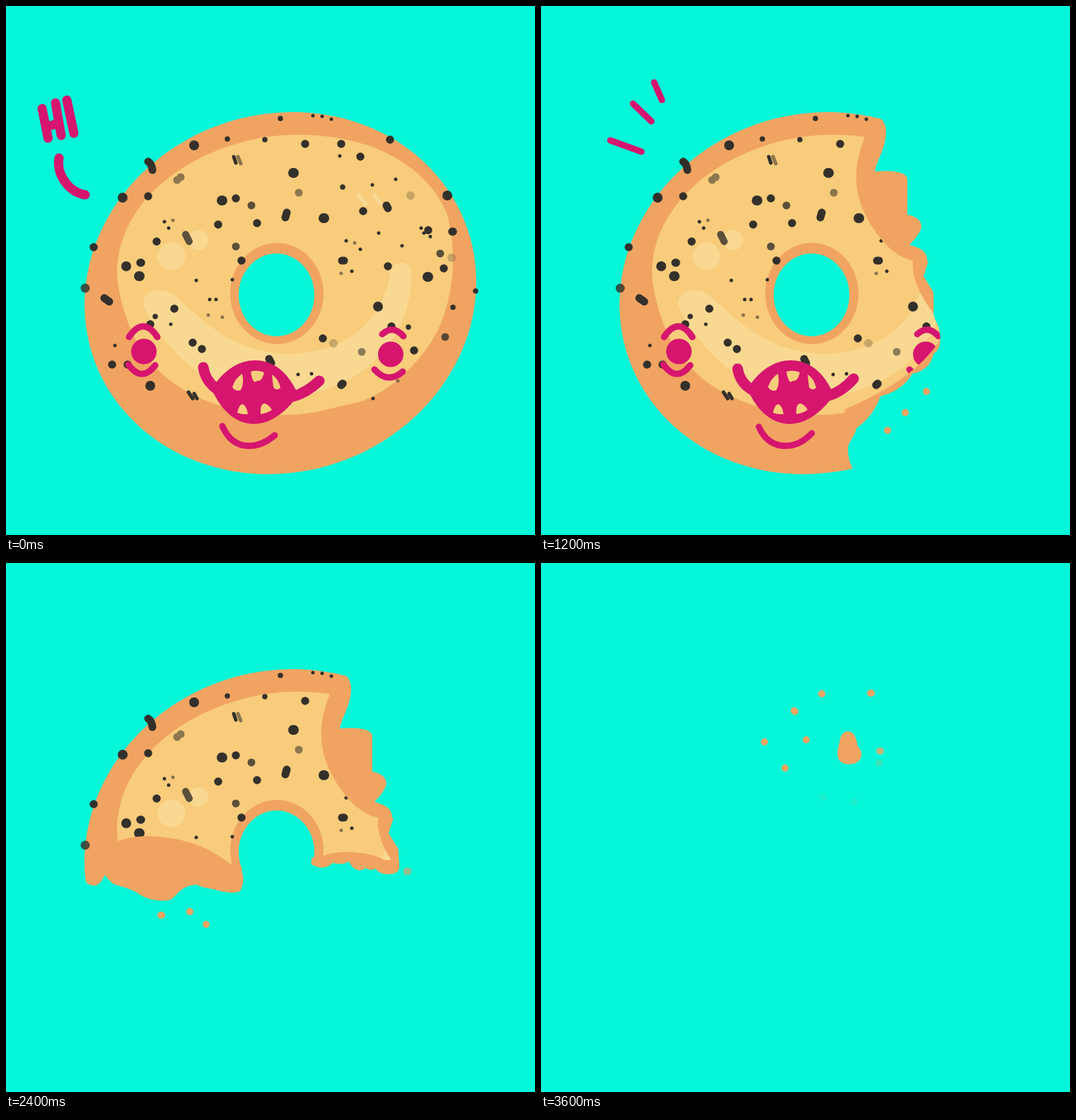
These frames come from a looping animation (748 by 748 pixels, 4 s). An HTML page without scripts:

```html
<!DOCTYPE html>
<html lang="en">
<head>
<meta charset="utf-8">
<title>Bitten bagel</title>
<style>
:root { --sky: #05f6d8; --crust: #f1a462; --cream: #f8cc7b; --shine: #f9d992; --pink: #d6156f; --seed: #33302b; }
html, body { margin: 0; width: 100%; height: 100%; overflow: hidden; background: var(--sky); }
svg { display: block; width: 100vw; height: 100vh; }

.sky { fill: var(--sky); }
.crust { fill: var(--crust); clip-path: url(#edge); }
.crumb { fill: none; stroke: var(--crust); stroke-width: 10; stroke-linecap: round; }
.seeds { fill: none; stroke: var(--seed); stroke-linecap: round; }
.pink { fill: var(--pink); }
.line { fill: none; stroke: var(--pink); stroke-width: 9; stroke-linecap: round; stroke-linejoin: round; }

/* a 4 s loop of ten 0.4 s poses; --k is the pose an item starts on */
.one, .two { visibility: hidden; animation: one 4s calc(var(--k) * .4s) step-end infinite; }
.two { animation-name: two; }
@keyframes one { 0% { visibility: visible } 10%, 100% { visibility: hidden } }
@keyframes two { 0% { visibility: visible } 20%, 100% { visibility: hidden } }

/* bites stay from their pose to the end of the loop */
.bite { animation: 4s step-end infinite; }
.b1 { animation-name: b1 } .b2 { animation-name: b2 } .b3 { animation-name: b3 } .b4 { animation-name: b4 }
.b5 { animation-name: b5 } .b6 { animation-name: b6 } .b7 { animation-name: b7 } .b8 { animation-name: b8 }
.b9 { animation-name: b9 }
@keyframes b1 { 0% { visibility: hidden } 10% { visibility: visible } }
@keyframes b2 { 0% { visibility: hidden } 20% { visibility: visible } }
@keyframes b3 { 0% { visibility: hidden } 30% { visibility: visible } }
@keyframes b4 { 0% { visibility: hidden } 40% { visibility: visible } }
@keyframes b5 { 0% { visibility: hidden } 50% { visibility: visible } }
@keyframes b6 { 0% { visibility: hidden } 60% { visibility: visible } }
@keyframes b7 { 0% { visibility: hidden } 70% { visibility: visible } }
@keyframes b8 { 0% { visibility: hidden } 80% { visibility: visible } }
@keyframes b9 { 0% { visibility: hidden } 90% { visibility: visible } }
</style>
</head>
<body>
<svg viewBox="0 0 748 748" xmlns="http://www.w3.org/2000/svg">
<defs>
  <clipPath id="edge"><ellipse cx="388" cy="406" rx="279.7" ry="253" transform="rotate(-19.1 388 406)"/></clipPath>
  <g id="jaw">
    <path class="pink" d="M291 542C320 490 385 482 413 550C375 605 320 607 291 542Z"/>
    <path fill="var(--cream)" d="M320 539Q324 526 334 520Q337 534 332 543Q325 546 320 539ZM346 517Q355 514 365 518Q362 532 355 530Q349 536 346 517ZM376 521Q386 528 388 540Q382 545 378 539ZM327 575Q330 562 335 563Q340 565 342 577Q334 578 327 575ZM360 577Q359 562 366 562Q372 564 376 571Q369 576 360 577Z"/>
  </g>
</defs>

<!-- bagel -->
<ellipse cx="388" cy="406" rx="279.7" ry="253" transform="rotate(-19.1 388 406)" fill="var(--crust)"/>
<path fill="var(--cream)" d="M415 182C530 183 600 235 624 295C643 370 625 440 600 477C575 515 530 555 490 562C450 571 430 578 395 578C270 577 195 520 170 440C160 410 157 390 157 375C160 255 300 180 415 182Z"/>
<g fill="var(--shine)">
  <path d="M194 424C192 402 220 396 236 408C275 440 315 490 400 492C480 490 530 450 543 380C546 356 573 358 573 380C573 440 545 490 495 522C440 556 370 562 320 546C260 520 215 470 194 424Z"/>
  <circle cx="234" cy="354" r="19.5"/>
  <circle cx="272" cy="331" r="14"/>
  <path d="M496 265L510 282M519 266L531 281" stroke="var(--shine)" stroke-width="6"/>
</g>
<ellipse cx="383" cy="406.500" rx="66" ry="71.500" fill="var(--crust)"/>
<ellipse class="sky" cx="382.500" cy="408.500" rx="53.500" ry="58.500"/>

<g class="seeds">
  <path stroke-width="14" d="M266 197h0M165 271h0M305 275h1M406 236h1M449 300h1M170 368h0M188 382h1M596 383h1M526 425h0M624 268h0M204 537h0"/>
  <path stroke-width="11.500" d="M201 269h0M325 272h0M300 309h0M355 307h0M213 333h0M333 360h0M191 363h-1M238 428h0M264 476h0M277 485h0M423 195h0M474 195h0M501 213h0M543 189h0M505 290h0M597 317h0M632 319h-1M619 371h0M540 368h0M577 487h0M150 507h0M172 507h0M448 470h0M545 453h0M204 450h0M476 534l-2 2M124 341h0"/>
  <path stroke-width="7.500" d="M388 159h0M313 188h0M366 189h0M476 256h0M569 454h0M632 426h0M664 403h0M211 439h0"/>
  <path stroke-width="5" d="M434 155h0M447 156h0M460 160h0M551 245h0M518 253h0M472 212h0M560 339h0M527 321h0M288 415h0M297 415h0M269 388h0M320 387h0M224 305h0M230 314h0M233 450h0M154 480h0M481 332h0M489 375h0M501 344h0M413 521h0M432 520h0M519 555h0M587 314h0M591 321h0M600 326h0M322 213l3 9M258 546l6 9M266 548l4 7"/>
  <path stroke-width="11" d="M397 292l-2 7M139 413l7 5M201 220Q206 223 207 232M372 499l3 6M475 360h3M538 282l2 4"/>
  <g opacity=".8">
    <path stroke-width="11" d="M347 282h0M325 340h0M614 350h0M621 468h0"/>
    <path stroke-width="13" d="M112 399h0"/>
    <path stroke-width="10" d="M254 323l5 10"/>
  </g>
  <g opacity=".55">
    <path stroke-width="11" d="M414 264h0M242 246h0M247 242h0M503 489h0"/>
    <path stroke-width="5" d="M328 213l4 10M236 303h0M474 378h0M493 335h0M286 437h0M306 440h0M554 530h0"/>
  </g>
  <path opacity=".25" stroke-width="12" d="M572 268h0M630 356h0M463 477h0"/>
</g>

<!-- right side, then top right -->
<g class="bite b1">
  <path class="crust" d="M526 360C522 400 560 450 602 475L690 475V262L640 270C590 280 545 320 526 360Z"/>
  <path class="sky" d="M548 360L541 382L554 403Q556 407 555 435Q560 458 580 468C610 478 630 476 652 468L690 460V280H650C625 290 620 312 603 315Q597 335 575 337Q568 352 548 360Z"/>
</g>
<g class="bite b2">
  <path class="crust" d="M458 185C440 230 440 270 470 315C490 345 510 357 526 360H560L700 300V100H480Z"/>
  <path class="sky" d="M473 140L475 157Q488 160 488 180C486 205 476 215 472 234C495 232 517 234 518 245V295C535 298 540 308 537 316C533 325 526 332 521 338C538 342 546 348 546 360L548 361H700V100H473Z"/>
</g>

<g>
  <circle class="pink" cx="544" cy="492.500" r="18"/>
  <path class="line" d="M532 464Q547 450 562 467M521 514Q540 535 561 517"/>
</g>

<!-- lower right -->
<g class="bite b3">
  <path class="crust" d="M580 440C560 500 500 540 430 570L400 690H700V440Z"/>
  <path class="sky" d="M556 436Q574 480 555 492Q550 515 525 520Q510 545 480 552Q470 580 446 597C444 610 434 615 434 627C434 640 438 648 441 655V700H700V436Z"/>
</g>
<g class="bite b4">
  <path class="crust" d="M432 416L449 414C470 405 515 408 535 420H680V690H430L398 578C385 550 384 520 388 470Z"/>
  <path class="sky" d="M437 414Q430 418 432 426Q437 430 447 431Q456 430 462 424Q475 428 485 422Q490 433 498 434Q505 435 508 431Q516 437 522 432Q530 441 540 440Q556 440 556 430V420H700V700H436L441 655C438 648 434 640 434 627C435 615 443 610 446 600C448 590 430 575 412 562C418 545 412 528 395 515C396 500 400 490 401 474Q401 468 395 466L390 440Z"/>
</g>

<!-- face -->
<g>
  <circle class="pink" cx="195" cy="488.500" r="18"/>
  <path class="line" d="M174 468Q194 438 214 468M173 507Q192 533 211 508"/>
</g>
<g class="one" style="--k:0">
  <ellipse cx="388" cy="406" rx="270" ry="246" transform="rotate(-19.1 388 406)" fill="none" stroke="#e99c5d" stroke-opacity=".15"/>
  <use href="#jaw"/>
  <path class="line" stroke-width="15" style="stroke-width:15px" d="M279 511Q282 531 300 543M443 530Q425 547 406 552"/>
  <path class="line" d="M306 594Q318 622 344 622Q362 622 380 607"/>
</g>
<g class="two" style="--k:1">
  <use href="#jaw" x="5" y="1"/>
  <path class="line" style="stroke-width:15px" d="M274 525Q280 548 304 553M439 513Q430 540 409 545"/>
  <path class="line" d="M317 603Q330 624 352 624Q376 624 392 601"/>
</g>
<g class="two" style="--k:3">
  <use href="#jaw" x="1"/>
  <path class="line" style="stroke-width:15px" d="M278 513Q282 535 301 544"/>
  <path class="line" d="M308 595Q320 622 346 622Q366 622 383 604"/>
</g>
<path class="line one" style="--k:3;stroke-width:15px" d="M442 527Q425 546 406 551"/>

<!-- bottom, lower left, upper left, middle -->
<g class="bite b5">
  <path class="crust" d="M326 450C300 500 250 560 235 690H460V458Z"/>
  <path class="sky" d="M338 453Q328 480 312 485Q315 520 290 530Q295 565 270 575Q280 605 260 638L255 700H480V450Z"/>
</g>
<g class="bite b6">
  <path class="crust" d="M100 412L135 409Q145 400 157 394C185 382 230 385 265 397C290 404 310 420 326 432L334 440L340 700H100Z"/>
  <path class="sky" d="M80 430H110C108 450 115 456 124 456C133 456 136 448 140 441Q147 452 155 455C165 458 175 460 185 466C200 478 225 480 235 475C245 465 252 455 270 455C280 460 290 460 300 463C315 467 325 467 331 464C336 455 337 445 333 435L345 435L420 480V700H80Z"/>
</g>
<g class="bite b7">
  <path class="crust" d="M180 232L254 230C290 232 320 260 333 290C342 312 345 330 346 349V366L90 480V232Z"/>
  <path class="sky" d="M80 226L194 233C184 246 187 258 207 270C212 285 215 300 233 307C245 318 260 324 280 311C300 308 320 311 333 315C325 330 322 345 318 357C322 370 332 374 342 370L350 361L375 400L345 480H80Z"/>
</g>
<g class="bite b8">
  <path class="crust" d="M300 140H380L420 162L430 183L449 212L470 240L457 300C448 320 440 338 428 351C442 364 449 385 449 414L432 420H300Z"/>
  <path class="sky" d="M170 130H500V160L487 168C480 163 470 170 460 165C452 160 452 152 445 152L410 149C395 148 386 158 386 168C386 178 405 180 412 192C420 205 421 213 412 225C395 245 385 260 386 280C387 292 393 297 394 301C380 320 374 330 377 345C382 358 395 360 405 370C401 380 400 395 405 403C412 406 414 408 416 413C424 417 430 416 434 417L425 425H300L170 300Z"/>
</g>

<!-- last morsel -->
<g class="bite b9">
  <path class="sky" d="M0 0H748V748H0Z"/>
  <path fill="var(--crust)" d="M434 238C444 238 446 250 448 259C457 268 455 285 435 284.500C414 284 419 265 422 254C423 243 428 238 434 238Z"/>
</g>

<!-- crumbs -->
<g class="crumb">
  <path class="one" style="--k:1" d="M633 403h0M612 375h0M603 420h0"/>
  <g class="one" style="--k:2">
    <path stroke-width="12" d="M537 227h0M576 241h0M548 263h0"/>
    <path stroke-width="12" stroke="#7dc59c" d="M633 403h0"/>
  </g>
  <path class="one" style="--k:3" d="M545 545h0M515 575h0M490 600h0"/>
  <path class="one" style="--k:4" stroke-width="11" stroke="#9fbb8c" d="M407 462h1M424 479l-4 4"/>
  <path class="one" style="--k:5" d="M340 540h0M365 515h0M325 590h0"/>
  <path class="one" style="--k:6" d="M219 498h1M260 493h0M283 511h0"/>
  <g class="one" style="--k:7">
    <path d="M168 298h0M248 350h1M272 346h0"/>
    <path stroke="#7dc59c" d="M162 194h0"/>
  </g>
  <path class="two" style="--k:8" d="M358 209l1 1M316 253h0M375 250h0M345 290h0"/>
  <g class="one" style="--k:9">
    <path d="M397 185h0M466 184h1"/>
    <path opacity=".8" d="M479 266h1"/>
    <path opacity=".25" d="M478 283h0"/>
    <path opacity=".1" d="M399 331h0M443 338h0"/>
  </g>
</g>
<g class="bite b4">
  <path class="crumb" style="stroke:#8ec295;stroke-width:11px" d="M567 436h1"/>
  <path class="bite b9 sky" d="M558 425h20v22h-20z"/>
</g>

<!-- shouts -->
<g class="line">
  <path class="one" style="--k:0" stroke-width="13" d="M51 145L59.500 187M70 137L78 183M60 170L74 166M86 133L96 180M75 215C71 236 87 263 112 267"/>
  <path class="one" style="--k:1" d="M105 220L146 228M137 160L162 181M170 137L178 160"/>
  <path class="one" style="--k:2" d="M97 214L138 226M127 153L153 177M161 131L171 154"/>
  <path class="one" style="--k:3" d="M98 190L142 206M130 138L156 163M160 108L171 133"/>
  <path class="one" style="--k:4" d="M70 233L119 238M91 156L126 179M126 124L142 149"/>
  <path class="one" style="--k:5" d="M96 212L138 222M114 140L146 166M148 105L162 132"/>
</g>
</svg>
</body>
</html>
```
